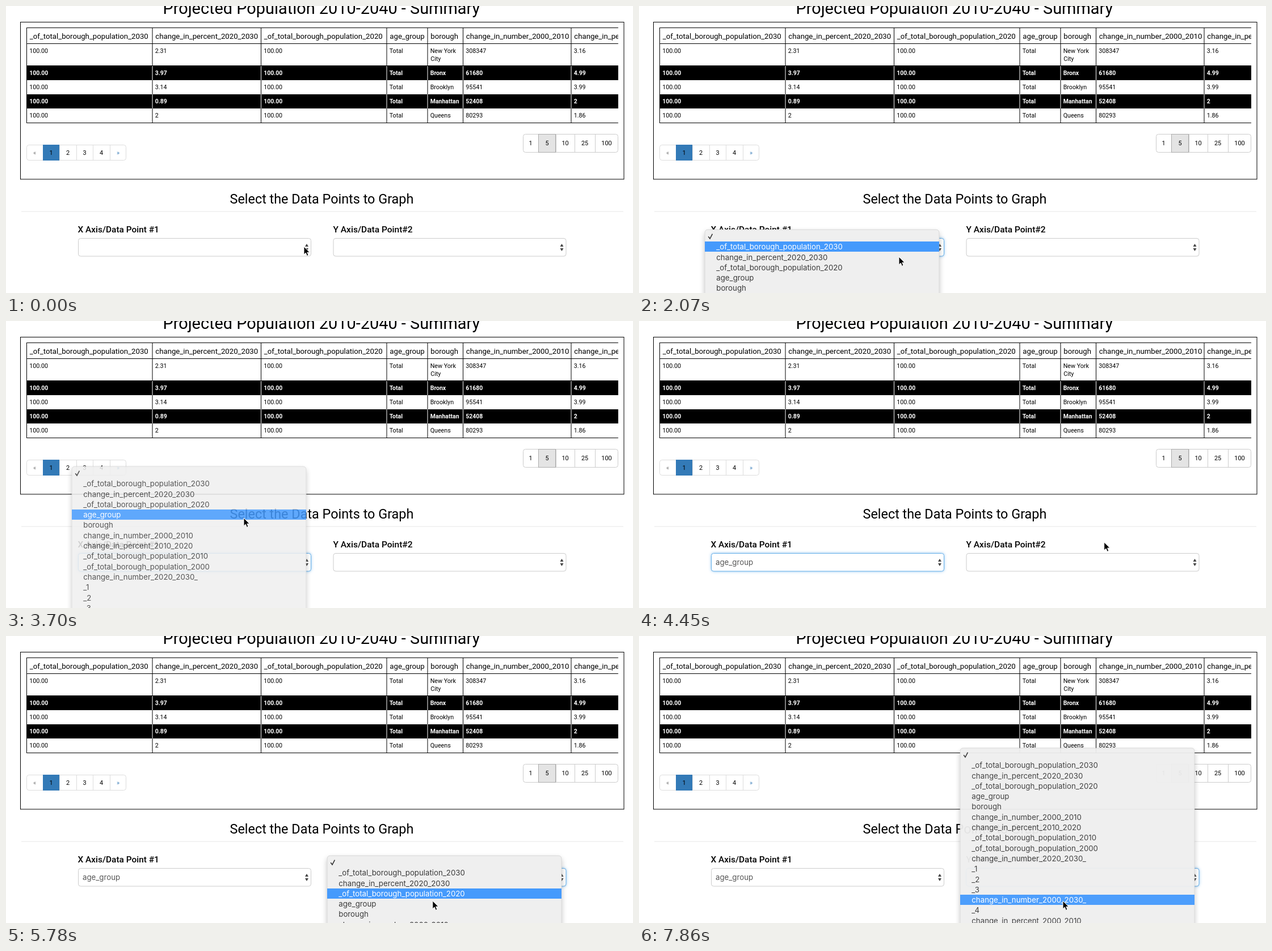
An HTML page that plays this animation: 1105 px wide and 507 px high, repeating every 8 s.

```html
<!DOCTYPE html>
<html lang="en">
<head>
<meta charset="utf-8">
<title>Select data points</title>
<style>
  html, body { margin: 0; width: 100%; height: 100%; overflow: hidden; background: #fff; }
  svg { display: block; width: 1105px; height: 507px; }
  text { font-family: Roboto, "Open Sans", sans-serif; white-space: pre; }
  .menu-text { font: 13.25px Inter, "Liberation Sans", sans-serif; }
</style>
</head>
<body>
<svg id="stage" viewBox="0 0 1105 507">
  <defs>
    <filter id="shadow" filterUnits="userSpaceOnUse" x="-30" y="-30" width="480" height="660">
      <feDropShadow dx="0" dy="5" stdDeviation="5" flood-color="#000" flood-opacity=".24"/>
    </filter>
    <filter id="glow" x="-10%" y="-50%" width="120%" height="200%">
      <feDropShadow dx="0" dy="0" stdDeviation="2.5" flood-color="#66afe9" flood-opacity=".7"/>
    </filter>
    <clipPath id="tableClip"><rect x="36" y="38" width="1043" height="170"/></clipPath>
  </defs>
</svg>
<script>
const NS = "http://www.w3.org/2000/svg";
const stage = document.getElementById("stage");
const LOOP = 8000, TICK = 148.2;
const ROW = 18.3, MENU_WIDTH = 413;

const fields = ["_of_total_borough_population_2030", "change_in_percent_2020_2030",
  "_of_total_borough_population_2020", "age_group", "borough",
  "change_in_number_2000_2010", "change_in_percent_2010_2020",
  "_of_total_borough_population_2010", "_of_total_borough_population_2000",
  "change_in_number_2020_2030_", "_1", "_2", "_3",
  "change_in_number_2000_2030_", "_4", "change_in_percent_2000_2010"];

function add(parent, tag, attrs, content) {
  const el = document.createElementNS(NS, tag);
  for (const k in attrs) el.setAttribute(k, attrs[k]);
  if (content !== undefined) el.textContent = content;
  parent.appendChild(el);
  return el;
}
const label = (parent, x, y, size, content, extra) =>
  add(parent, "text", { x, y, "font-size": size, fill: "#000", ...extra }, content);
const line = (parent, x1, y1, x2, y2, stroke) =>
  add(parent, "path", { d: `M${x1} ${y1}L${x2} ${y2}`, stroke });
const box = (parent, x, y, width, height, attrs) =>
  add(parent, "rect", { x, y, width, height, ...attrs });

function drawTable() {
  const g = add(stage, "g", { "clip-path": "url(#tableClip)" });
  const cols = [36.5, 258, 449.5, 671, 743, 805.5, 996];
  const rows = [
    "100.00 2.31 100.00 Total New_York 308347 3.16",
    "100.00 3.97 100.00 Total Bronx 61680 4.99",
    "100.00 3.14 100.00 Total Brooklyn 95541 3.99",
    "100.00 0.89 100.00 Total Manhattan 52408 2",
    "100.00 2 100.00 Total Queens 80293 1.86"];

  for (const y of [38.5, 66.5, 105.5, 206.5]) line(g, 36, y, 1090, y, "#000");
  cols.forEach((x, i) => {
    line(g, x, 38, x, 207, "#000");
    label(g, x + 5.3, 58, 13.2, fields[i]);
  });
  rows.forEach((row, r) => {
    const dark = r % 2 === 1, top = 81 + 25 * r;
    if (dark) {
      box(g, 36, top, 1060, 25, { fill: "#000" });
      cols.slice(1).forEach(x => line(g, x, top, x, top + 25, "#fff"));
    }
    row.split(" ").forEach((cell, c) =>
      label(g, cols[c] + 4.7, r ? top + 16 : 83, dark ? 10.5 : 10.7, cell.replace("_", " "),
        dark ? { fill: "#fff", "font-weight": 700 } : {}));
  });
  label(g, 748.2, 97, 10.7, "City");
}

// Joined buttons; the second one is the active one.
function drawButtons(edges, top, height, names, edge, active) {
  const left = edges[0], right = edges[edges.length - 1];
  box(stage, left + .5, top + .5, right - left - 1, height, { rx: 4, fill: "#fff", stroke: edge });
  edges.slice(1, -1).forEach(x => line(stage, x + .5, top + 1, x + .5, top + height, edge));
  box(stage, edges[1] + .5, top + .5, edges[2] - edges[1] - 1, height, active);
  names.forEach((name, i) =>
    label(stage, (edges[i] + edges[i + 1]) / 2, top + height / 2 + 4.2, 10.9, name, {
      "text-anchor": "middle",
      fill: name === "«" ? "#777" : name === "»" ? "#337ab7" : "#000"
    }));
}

function drawSelect(x) {
  const frame = box(stage, x + .5, 410.5, 410, 31.5, { rx: 4, fill: "#fff" });
  add(stage, "path", { d: `M${x + 400} 425l3-5 3 5zm0 3l3 5 3-5z`, fill: "#444" });
  const value = label(stage, x + 8, 431, 13.25, "", { class: "menu-text", fill: "#555" });
  return (focused, content) => {
    frame.setAttribute("stroke", focused ? "#66afe9" : "#ccc");
    frame.setAttribute("filter", focused ? "url(#glow)" : "none");
    value.textContent = content;
  };
}

// Opens over its select, scrolls up to the end position, then fades when closed.
function drawMenu({ x, from, to, open, scroll, close }) {
  const g = add(stage, "g", {});
  box(g, 0, 0, MENU_WIDTH, 600, { rx: 5, fill: "#efefef", stroke: "#c4c4c4", "stroke-width": .6, filter: "url(#shadow)" });
  const bar = box(g, 0, 0, MENU_WIDTH, 18, { fill: "#459afc" });
  add(g, "path", { d: "M6.2 12.2l2.8 3.8 4.4-8.4", fill: "none", stroke: "#333", "stroke-width": 1.6 });
  const texts = fields.map((name, i) =>
    label(g, 20.3, 16.9 + ROW * (i + 1), 13.25, name, { class: "menu-text" }));

  const topAt = k => {
    const u = Math.min(1, Math.max(0, (k - scroll) / 3));
    return Math.round(from + (to - from) * u * u);
  };
  // The highlight follows the pointer one tick late.
  const pickedAt = k => {
    const [px, py] = pointerAt(k - 1);
    const inside = px > x && px < x + MENU_WIDTH;
    return inside ? Math.max(0, Math.floor((py - topAt(k - 1) - 3) / ROW)) : 0;
  };
  return k => {
    const picked = pickedAt(k);
    g.setAttribute("display", k >= open && k < close + 2 ? "inline" : "none");
    g.setAttribute("opacity", Math.min(1, 1 - .14 * (k - close)));
    g.setAttribute("transform", `translate(${x} ${topAt(k)})`);
    bar.setAttribute("display", picked ? "inline" : "none");
    bar.setAttribute("y", Math.round(3 + ROW * picked));
    texts.forEach((t, i) => t.setAttribute("fill", i + 1 === picked ? "#fff" : "#3a3a3a"));
  };
}

// Pointer stops as [tick, x, y], with straight moves between them.
const stops = [[0, 525, 425], [1, 525, 425], [4, 556, 430], [9, 530, 409], [12, 458, 443],
  [17, 458, 443], [19, 427, 393], [22, 419, 348], [25, 419, 348], [32, 980, 408],
  [36, 752, 456], [38, 752, 470], [44, 751, 457.5], [49, 747, 468], [54, 747, 468]];

function pointerAt(k) {
  const i = Math.max(1, stops.findIndex(s => s[0] >= k));
  const [k0, x0, y0] = stops[i - 1], [k1, x1, y1] = stops[i];
  const u = Math.max(0, (k - k0) / (k1 - k0));
  return [x0 + (x1 - x0) * u, y0 + (y1 - y0) * u];
}

label(stage, 276.5, 13.5, 28.9, "Projected Population 2010-2040 - Summary");
box(stage, 25.5, 28.5, 1063.5, 277.5, { fill: "none", stroke: "#000" });
drawTable();
const pagerEdges = Array.from({ length: 7 }, (_, i) => Math.round(35.5 + 29.4 * i));
drawButtons(pagerEdges, 245, 27, ["«", "1", "2", "3", "4", "»"], "#ddd",
  { fill: "#337ab7", stroke: "#337ab7" });
drawButtons([911, 938, 969, 1002, 1038, 1079], 226, 32, ["1", "5", "10", "25", "100"], "#ccc",
  { fill: "#e4e4e4", stroke: "#adadad" });
label(stage, 394.5, 349, 23.4, "Select the Data Points to Graph");
line(stage, 27, 363, 1088, 363, "#e6e6e6");
label(stage, 126.5, 400, 15.4, "X Axis/Data Point #1", { "font-weight": 500 });
label(stage, 576.5, 400, 15.5, "Y Axis/Data Point#2", { "font-weight": 500 });

const plans = {
  x: { x: 116, from: 412, to: 257, open: 7, scroll: 13, close: 24 },
  y: { x: 566, from: 412, to: 198, open: 31, scroll: 38, close: 52.65 }
};
const showX = drawSelect(127), showY = drawSelect(576.5);
const menuX = drawMenu(plans.x), menuY = drawMenu(plans.y);
const cursor = add(stage, "path", {
  d: "M0 0V14.2L3.3 11.1L5.5 16.4L8 15.3L5.8 10.2H10.2Z",
  fill: "#000", stroke: "#fff", "stroke-width": 1
});

function draw(ms) {
  const k = Math.min(53, Math.floor((ms % LOOP + 6) / TICK));
  const second = k >= plans.y.open;
  showX(k >= plans.x.open && !second, k >= plans.x.close + 2 ? "age_group" : "");
  showY(second, "");
  menuX(k);
  menuY(k);
  cursor.setAttribute("transform", `translate(${pointerAt(k).join(" ")})`);
}

const start = performance.now();
function frame() {
  draw(performance.now() - start);
  requestAnimationFrame(frame);
}
frame();
</script>
</body>
</html>
```
